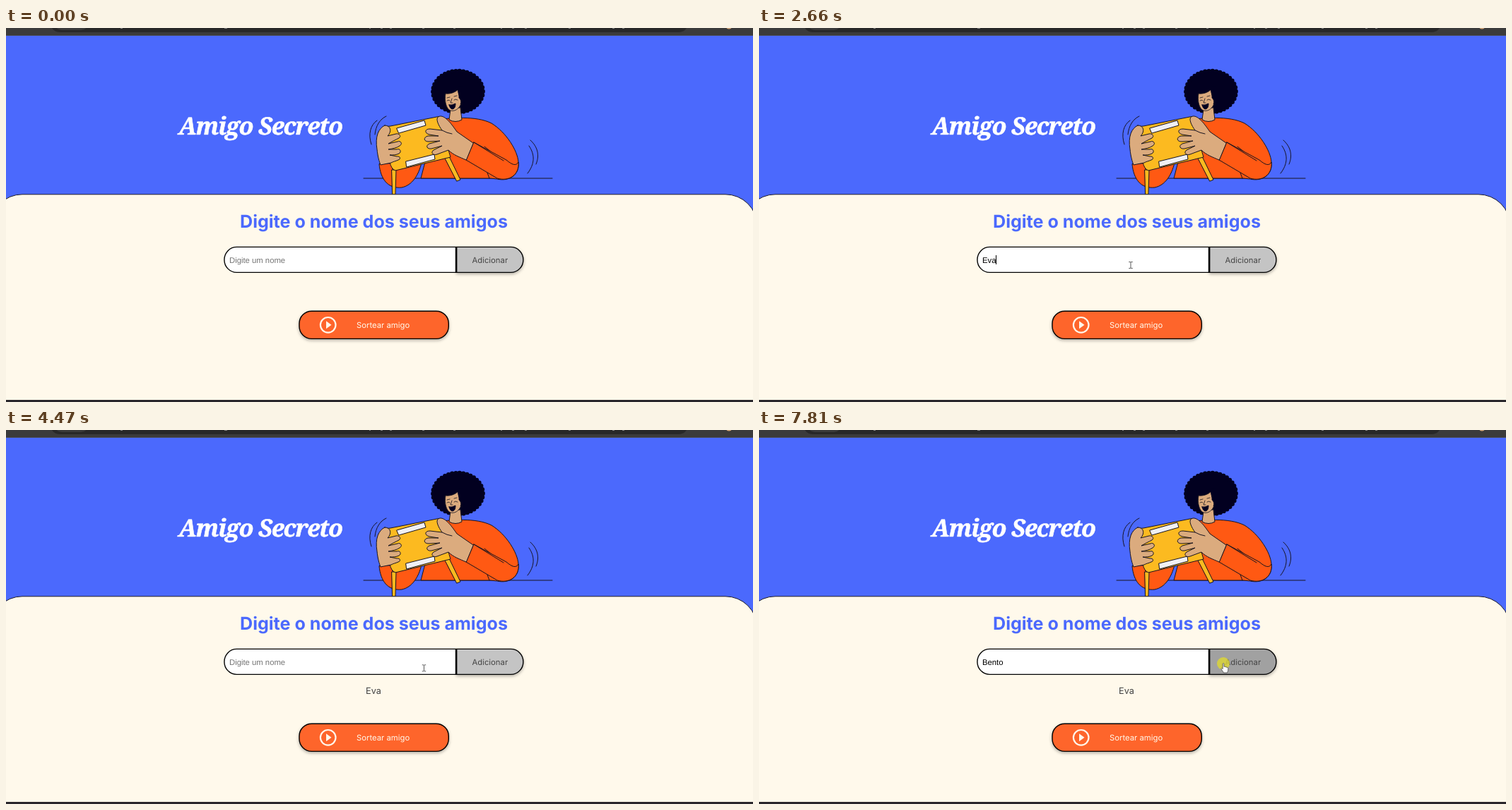
These frames come from a looping animation (1057 by 530 pixels, 8000 ms). An HTML page:

```html
<!DOCTYPE html>
<html lang="pt-BR">
<head>
<meta charset="utf-8">
<title>Amigo Secreto</title>
<style>
  html, body { margin: 0; width: 100%; height: 100%; overflow: hidden; background: #4b69fd; }
  svg { display: block; width: 1057px; height: 530px; text-rendering: geometricPrecision; }
  text { font-family: Inter, sans-serif; font-size: 11.3px; fill: #444; }
  .mid { text-anchor: middle; }
  .title { font: italic 900 34px "Noto Serif", serif; letter-spacing: -.036em; fill: #fff; stroke: #fff; stroke-width: .6; }
  .heading { font-size: 25.1px; font-weight: 700; fill: #4b69fd; }
  .field { font-family: "Liberation Sans", Arial, sans-serif; }
  .box { stroke: #000; stroke-width: 1.4; }
  .shadow { filter: drop-shadow(0 2.5px 2px rgba(0, 0, 0, .3)); }
  .art { stroke: #17131f; stroke-width: 1; stroke-linejoin: round; stroke-linecap: round; }
  .skin { fill: #dbab7e; }
  .orange { fill: #ff5913; }
  .yellow { fill: #fcba20; }
  .label { fill: #f0f0f3; }
  .line { fill: none; }
  .hair { fill: #020020; stroke: #020020; }
</style>
</head>
<body>
<svg viewBox="0 0 1057 530">
  <rect width="1057" height="530" fill="#4b69fd"/>

  <!-- browser edge -->
  <rect width="1057" height="11" fill="#3b3b3b"/>
  <rect y="10" width="1057" height="1" fill="#484848"/>
  <rect x="63" y="-20" width="902" height="26" rx="13" fill="#282828"/>
  <rect x="68" y="-20" width="49" height="23" rx="11" fill="#3b3b3b"/>
  <path d="M162 .5h3M309 .5h4M514 .5h2M530 .5h3M543 .5h3M589 .5h3M633 .5h3M700 .5h2M716 .5h3M734 .5h3M796 .5h3M858 .5h3M872 .5h3" stroke="#999" stroke-width=".8"/>
  <circle cx="1023" cy="-3" r="4.5" fill="#d8a878"/>

  <text class="title mid" x="360" y="150.5">Amigo Secreto</text>

  <!-- illustration -->
  <g class="art">
    <path class="line" d="M506 213H773"/>
    <path class="line" d="M517 165C512 150 516 137 525 131M522 151C523 139 529 129 538 125M742 159C753 169 755 181 750 193M740 167C749 180 748 193 738 206"/>

    <ellipse class="hair" cx="639.5" cy="90" rx="35.5" ry="29"/>
    <ellipse class="hair" cx="639.5" cy="90" rx="35.2" ry="29" stroke-width="6.4" stroke-dasharray="0 5.3"/>

    <path class="orange" d="M600 131C630 127 665 124 687 135C708 148 724 174 725 190C727 208 712 218 695 214L685 213H587L594 186Z"/>
    <path class="line" d="M677 168L687 176M684 213L681 205"/>
    <path class="skin" d="M629 115L627 130Q636 135 645 130L643 113Z"/>
    <path class="skin" d="M622 93C630 94 639 90 642 84L645 102C644 112 637 119 629 117C623 115 620 103 622 93Z" stroke-width=".8"/>
    <path class="hair" d="M641 82C637 88 642 94 641 99C643 101 645 104 643 108L650 104V84Z" stroke="none"/>
    <path class="hair" d="M627 109Q631 110 636 107Q636 115 631 115Q628 114 627 109Z" stroke="none"/>
    <path class="line" d="M624 103Q626 101 628 103M634 102Q636 100 639 102M624 99L628 98M634 97L638 96M631 100L629 106L632 106" stroke-width=".8"/>

    <path class="orange" d="M528 193C530 214 540 228 560 226C575 223 584 208 588 191L547 200L545 192Z"/>
    <path class="yellow" d="M546 201H552L551 236H547Z"/>
    <path class="yellow" d="M621 184L627 182L643 215L638 217Z"/>
    <path class="yellow" d="M533 143Q537 139 544 139L612 125.5L629 183L551 202Q545 200 543 190Z"/>
    <path class="label" d="M553 142L592 131L594 138L556 149Z"/>
    <path class="label" d="M566 189L606 179L607 186L567 197Z"/>

    <path class="skin" d="M536 138C527 142 522 154 525 172C526 182 528 189 530 194L545 191C548 189 551 189 555 187C559 186 558 181 553 182L543 180C548 180 552 180 556 178C560 176 558 170 553 172L541 172C547 171 553 170 557 167C562 164 558 159 554 161L541 164C546 161 552 158 556 156C560 153 556 149 552 150L540 153C546 147 545 138 536 138Z"/>
    <path class="orange" d="M662 162L708 187C716 194 722 196 725 190C727 208 712 218 695 213L651 187Z"/>
    <path class="line" d="M662 162L704 188"/>
    <path class="skin" d="M661 163L638 147C631 137 622 124 614 125C607 126 610 135 617 145L600 143C592 143 592 149 599 151L612 153L597 153C590 155 591 161 598 161L614 160L599 164C593 167 596 172 602 171L617 167L605 173C600 177 605 181 610 179L626 173C633 180 642 183 651 187Z"/>
    <path class="line" d="M617 145Q624 149 631 150"/>
  </g>

  <!-- page body -->
  <rect x="-22" y="235.8" width="1085" height="340" rx="45" fill="#fff9eb" stroke="#16162a" stroke-width="1"/>
  <rect y="527" width="1057" height="3" fill="#28262b"/>
  <text class="heading mid" x="520.5" y="282.5">Digite o nome dos seus amigos</text>

  <path id="add" class="box shadow" d="M637.7 310.4H714.4A17.5 18 0 0 1 714.4 346.4H637.7Z"/>
  <path class="box" d="M636.5 310.4H326.4A17.5 18 0 0 0 326.4 346.4H636.5Z" fill="#fff"/>
  <text class="mid" x="684.8" y="332.5">Adicionar</text>
  <text id="entry" class="field" x="316" y="332.5"></text>
  <rect id="caret" y="322" width="1" height="13" fill="#000"/>

  <text id="item" class="mid" x="520" y="374" style="font-size:12.7px">Eva</text>
  <g id="draw">
    <rect class="box shadow" x="415" y="401.2" width="211.3" height="39.2" rx="17.6" fill="#fe652b"/>
    <circle cx="455.7" cy="420.8" r="10.8" fill="none" stroke="#fff6ea" stroke-width="2.2"/>
    <path d="M453 415.3V426.3L460.5 420.8Z" fill="#fff6ea"/>
    <text x="496" y="425" style="fill:#fff9eb">Sortear amigo</text>
  </g>

  <g id="pointer">
    <circle id="click" r="9" fill="#dfd832" fill-opacity=".8"/>
    <path id="arrow" d="M0 0V10L2.4 8L4 11.3L5.5 10.6L4 7.3H7Z" fill="#fff" stroke="#222" stroke-width=".7"/>
    <path id="beam" d="M-2.7 -4.5H-.7L0 -4L.7 -4.5H2.7M0 -4V4M-2.7 4.5H-.7L0 4L.7 4.5H2.7" fill="none" stroke="#444" stroke-width=".9"/>
    <path id="hand" d="M-.8 .6C-.8 -.8 1 -.8 1 .6V4.5C1.8 3.8 2.8 4.1 3 5C3.8 4.4 4.8 4.8 5 5.6C6 5.2 6.8 5.8 6.8 6.8V9C6.8 11 5.8 11.6 5.6 13H.3C0 11.2 -2.2 9.4 -3 7.7C-3.4 6.6 -2 6 -1.4 7L-.8 7.6Z" fill="#fff" stroke="#333" stroke-width=".7"/>
  </g>
</svg>
<script>
  const LOOP = 8000;
  const $ = id => document.getElementById(id);
  const entry = $('entry'), caret = $('caret');

  // start, end, steps, from, to
  const moves = [
    [500, 570, 2, [812, 488], [609, 397]],
    [770, 1110, 6, [609, 397], [526, 336]],
    [3190, 3730, 8, [526, 336], [710, 324]],
    [4330, 4540, 4, [710, 324], [586, 338]],
    [7260, 7540, 5, [586, 338], [657, 331]]
  ];
  const typing = [
    [0, ''], [2240, 'E'], [2390, 'Ev'], [2660, 'Eva'], [4130, ''],
    [5860, 'B'], [6130, 'Be'], [6260, 'Ben'], [6530, 'Bent'], [6730, 'Bento']
  ];
  const caretOn = [[1320, 1840], [2240, 3190], [4730, 5260], [5790, 7260]];
  const clicks = [[1320, 1510], [3930, 4130], [4730, 5000], [7810, LOOP]];

  const within = (spans, t) => spans.some(([a, b]) => t >= a && t < b);
  const last = (list, t) => list.filter(e => t >= e[0]).pop();
  const show = (id, on) => $(id).setAttribute('visibility', on ? 'visible' : 'hidden');
  const ease = p => 1 - Math.pow(1 - p, 2.25);

  function pointerAt(t) {
    const move = last(moves, t);
    if (!move) return moves[0][3];
    const [a, b, n, from, to] = move;
    const step = Math.min(n, Math.floor((t - a) / (b - a) * (n - 1) + 1e-6) + 1);
    return from.map((v, i) => v + (to[i] - v) * ease(step / n));
  }

  function render(t) {
    const [x, y] = pointerAt(t);
    const inRow = y > 310 && y < 347;
    const hover = inRow && x > 637 && x < 732;
    const beam = inRow && x > 308 && x <= 637;
    const seen = t >= 430;
    $('pointer').setAttribute('transform', `translate(${x} ${y})`);
    show('arrow', seen && !hover && !beam);
    show('beam', seen && beam);
    show('hand', seen && hover);
    show('click', within(clicks, t));
    $('add').setAttribute('fill', hover ? '#a1a1a1' : '#c4c4c4');

    const name = last(typing, t)[1];
    const value = name || 'Digite um nome';
    if (entry.textContent !== value) entry.textContent = value;
    entry.style.fill = name ? '#000' : '#757575';
    caret.setAttribute('x', 316 + (name ? Math.floor(entry.getComputedTextLength()) : 0));
    show('caret', within(caretOn, t));

    const added = t >= 4130;
    show('item', added);
    $('draw').setAttribute('transform', `translate(0 ${added ? 15 : 0})`);
  }

  const begin = performance.now();
  function tick() {
    render((performance.now() - begin) % LOOP);
    requestAnimationFrame(tick);
  }
  tick();
</script>
</body>
</html>
```
